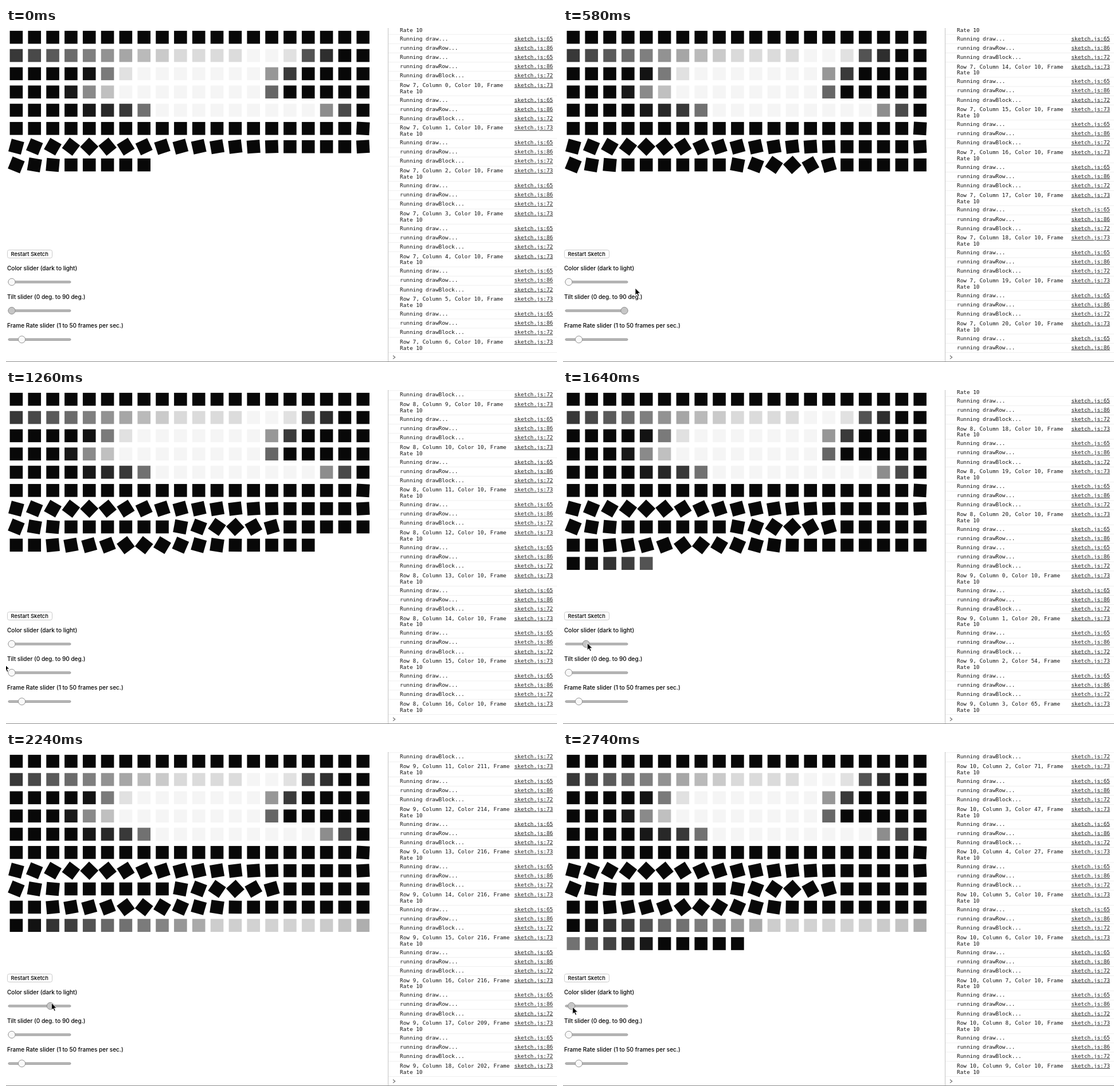
Recreate the animation shown at these times as an HTML page. Size 961 by 583 pixels, loop 2760 ms.

```html
<!DOCTYPE html>
<html lang="en">
<head>
<meta charset="utf-8">
<title>Block sketch</title>
<style>
  html, body { margin: 0; width: 100%; height: 100%; overflow: hidden; background: #fff; }
  svg { display: block; width: 100%; height: 100%; }
  text { white-space: pre; }
  #log text { font: 9.35px "DejaVu Sans Mono", monospace; fill: #111; }
  #log .link { text-decoration: underline; fill: #222; }
  .label { font: 500 10.05px Inter, sans-serif; }
  .button { font: 500 9.4px Inter, sans-serif; }
</style>
</head>
<body>
<svg viewBox="0 0 961 583">
  <rect width="961" height="583" fill="#fff"/>
  <g id="tiles"></g>
  <rect x="2.5" y="387.5" width="78" height="14" rx="3" fill="#fff" stroke="#c9c9c9"/>
  <text class="button" x="8.5" y="398.2">Restart Sketch</text>
  <text class="label" x="2" y="422.7">Color slider (dark to light)</text>
  <text class="label" x="2" y="472.7">Tilt slider (0 deg. to 90 deg.)</text>
  <text class="label" x="2" y="522.9">Frame Rate slider (1 to 50 frames per sec.)</text>
  <g id="sliders"></g>
  <path id="cursor" d="M0 0V12.4L2.9 9.8L4.9 14.3L7 13.4L5 9H9Z" fill="#000" stroke="#fff" stroke-width=".9"/>
  <rect x="666" width="295" height="583" fill="#fff"/>
  <g id="log"></g>
  <path d="M666.5 0V583" stroke="#c4c4c4"/>
  <path d="M675 571.8L678.6 574.7L675 577.6" fill="none" stroke="#6e6e6e" stroke-width="1.2"/>
  <path d="M0 582.5H961" stroke="#8c8c8c"/>
</svg>
<script>
const LOOP = 2760, TICK = 20, STEP = 40;
const COLS = 20, ROW_STEPS = 22;
const START_STEP = 7 * ROW_STEPS + 7;
const PITCH = 31.83, SIZE = 22.6;

const $ = id => document.getElementById(id);

// Piecewise linear value at x; key points are "x:y" pairs
const curve = points => {
  const keys = points.trim().split(/\s+/).map(p => p.split(':').map(Number));
  return x => {
    const i = keys.findIndex(k => k[0] >= x);
    if (i <= 0) return keys.at(i)[1];
    const [x0, y0] = keys[i - 1], [x1, y1] = keys[i];
    return y0 + (y1 - y0) * (x - x0) / (x1 - x0);
  };
};

// How the sliders are dragged, by step; each tile takes the value of its own step
const colorAt = curve(`21:10 22:59 25:111 29:192 31:224 34:227 35:252 36:252 37:232 38:87 40:10
  47:10 48:21 50:232 51:252 57:252 59:61 60:10
  68:10 69:28 70:143 72:252 79:252 80:106 81:10
  91:10 94:60 95:117 96:252 104:252 105:146 107:10
  198:10 199:20 200:54 201:65 203:108 206:137 208:175 209:211 211:216 214:216
  216:202 217:180 220:118 223:47 224:27 225:10 229:10 229.5:22`);
const tiltAt = curve(`128:0 129:3 132:15 136:44 140:72 145:86 147:90 150:90 151:87
  154:22 155:10 157:0 162:0 164:21 168:74 169:90 177:90 181:69 183:38 188:1 189:0`);

// Pointer relative to the held knob, and its height, by time
const pointerDx = curve('0:-24 60:0 300:0 400:19 580:19 660:0 1080:0 1140:-24 1260:-13 1460:2 2740:2');
const pointerY = curve('0:492 400:468 580:454 700:476 960:485 1260:478 1440:443 2240:438 2740:445');

const stepAt = (row, col) => row * ROW_STEPS + col;
const position = step => [Math.floor(step / ROW_STEPS), step % ROW_STEPS];
const colorKnob = step => 10 + (colorAt(step) - 10) / 245 * 97;
const tiltKnob = step => 10 + tiltAt(step) / 90 * 97;

function tile(row, col) {
  const step = stepAt(row, col);
  const x = 17.9 + col * PITCH, y = 16.2 + row * PITCH;
  const grey = Math.round(colorAt(step) * .98 - 2);
  return `<rect x="${-SIZE / 2}" y="${-SIZE / 2}" width="${SIZE}" height="${SIZE}" ` +
    `fill="rgb(${grey},${grey},${grey})" transform="translate(${x} ${y}) rotate(${tiltAt(step)})"/>`;
}

function drawTiles(step) {
  let out = '';
  for (let s = 0; s <= step; s++) {
    const [row, col] = position(s);
    if (col < COLS) out += tile(row, col);
  }
  return out;
}

function slider(y, x, pressed) {
  return `<rect x="4" y="${y - 1.6}" width="109" height="3.4" rx="1.7" fill="#b8b8b8" stroke="#8d8d8d" stroke-width=".8"/>` +
    `<circle cx="${x}" cy="${y}" r="6.1" fill="${pressed ? '#c6c6c6' : '#f9f9f9'}" stroke="#868686" stroke-width=".9"/>`;
}

// Console entries of one step, newest first: [line number, ...text lines]
function entries(step) {
  const [row, col] = position(step);
  const call = [[86, 'running drawRow...'], [65, 'Running draw...']];
  if (col > COLS) return call;
  return [
    [73, `Row ${row}, Column ${col}, Color ${Math.round(colorAt(step))}, Frame`, 'Rate 10'],
    [72, 'Running drawBlock...'],
    ...call
  ];
}

function drawLog(step) {
  let out = '', bottom = 566.4;
  for (let s = step; bottom > 0; s--) {
    for (const [line, ...texts] of entries(s)) {
      const wrapped = texts.length > 1;
      const first = bottom - (wrapped ? 15.5 : 5.8);
      out += `<path d="M667 ${bottom}H961" stroke="#efefef"/>`;
      texts.forEach((str, i) => out += `<text x="687" y="${first + i * 10.9}">${str}</text>`);
      out += `<text class="link" x="954" y="${first}" text-anchor="end">sketch.js:${line}</text>`;
      bottom -= wrapped ? 26.4 : 16.1;
    }
  }
  return out;
}

function render(t) {
  const now = START_STEP + t / STEP;
  const tilting = t < 1240, coloring = t >= 1480;
  const held = tilting ? tiltKnob(now) : colorKnob(now);
  $('tiles').innerHTML = drawTiles(Math.floor(now));
  $('log').innerHTML = drawLog(Math.floor(now - TICK / STEP));
  $('sliders').innerHTML =
    slider(443.3, colorKnob(now), coloring) +
    slider(493.4, tiltKnob(now), tilting) +
    slider(543.7, 27.6, false);
  $('cursor').setAttribute('transform', `translate(${held + pointerDx(t)} ${pointerY(t)})`);
}

const start = performance.now();
let shown = -1;
function loop() {
  const elapsed = (performance.now() - start) % LOOP;
  const t = elapsed < 2 * TICK ? 0 : Math.floor(elapsed / TICK) * TICK;
  if (t !== shown) render(shown = t);
  requestAnimationFrame(loop);
}
loop();
</script>
</body>
</html>
```
